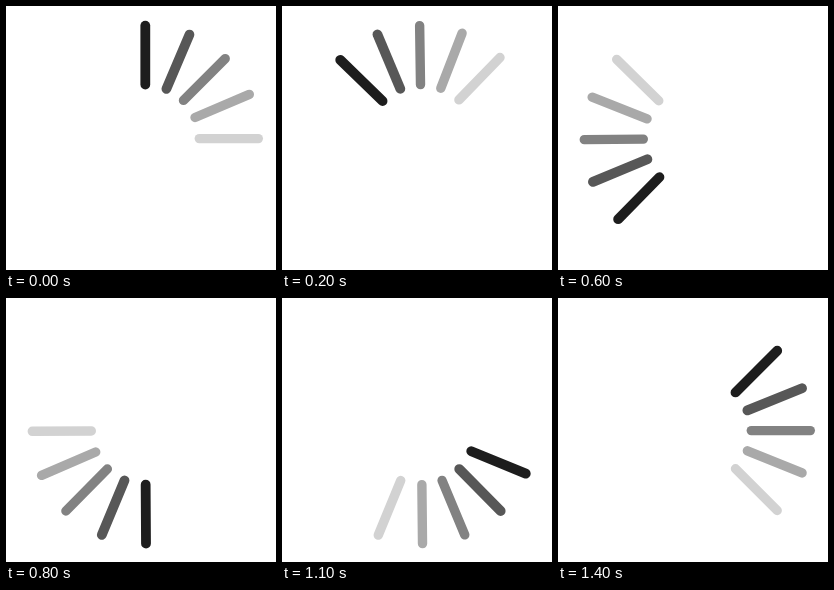
Animation, 270 px wide and 264 px high, one loop 1500 ms. Source, as an HTML page:

```html
<!DOCTYPE html>
<html lang="en">
<head>
<meta charset="utf-8">
<title>Spinner</title>
<style>
  html, body { margin: 0; width: 100%; height: 100%; overflow: hidden; background: #fff; }
  svg { display: block; width: 100vw; height: 100vh; }
  line { stroke-linecap: round; }
</style>
</head>
<body>
<svg viewBox="0 0 270 264"><g id="spokes"></g></svg>
<script>
  const NS = 'http://www.w3.org/2000/svg';
  const CX = 139.3, CY = 132.6, INNER = 54, OUTER = 113;
  const STEP = 22.5, STEPS = 15, STEP_MS = 100;
  const spokes = [
    { angle: 0, shade: '#1d1d1d' },
    { angle: 23, shade: '#575757' },
    { angle: 45, shade: '#828282' },
    { angle: 67, shade: '#a9a9a9' },
    { angle: 90, shade: '#d2d2d2' }
  ];
  const group = document.getElementById('spokes');

  spokes.forEach(({ angle, shade }, i) => {
    const line = document.createElementNS(NS, 'line');
    const attrs = {
      x1: 0, x2: 0, y1: -INNER, y2: -OUTER,
      stroke: shade, 'stroke-width': i < 2 ? 9.8 : 9.4,
      transform: `rotate(${angle})`
    };
    for (const key in attrs) line.setAttribute(key, attrs[key]);
    group.append(line);
  });

  // The first step overshoots by about a degree; later steps win it back.
  const angleAt = n => n * STEP + (n ? Math.max(0, 1 - n * 0.08) : 0);

  const start = performance.now();
  function draw() {
    const elapsed = Math.max(0, performance.now() - start);
    const n = Math.floor(elapsed / STEP_MS) % STEPS;
    group.setAttribute('transform', `translate(${CX} ${CY}) rotate(${-angleAt(n)})`);
    requestAnimationFrame(draw);
  }
  draw();
</script>
</body>
</html>
```
